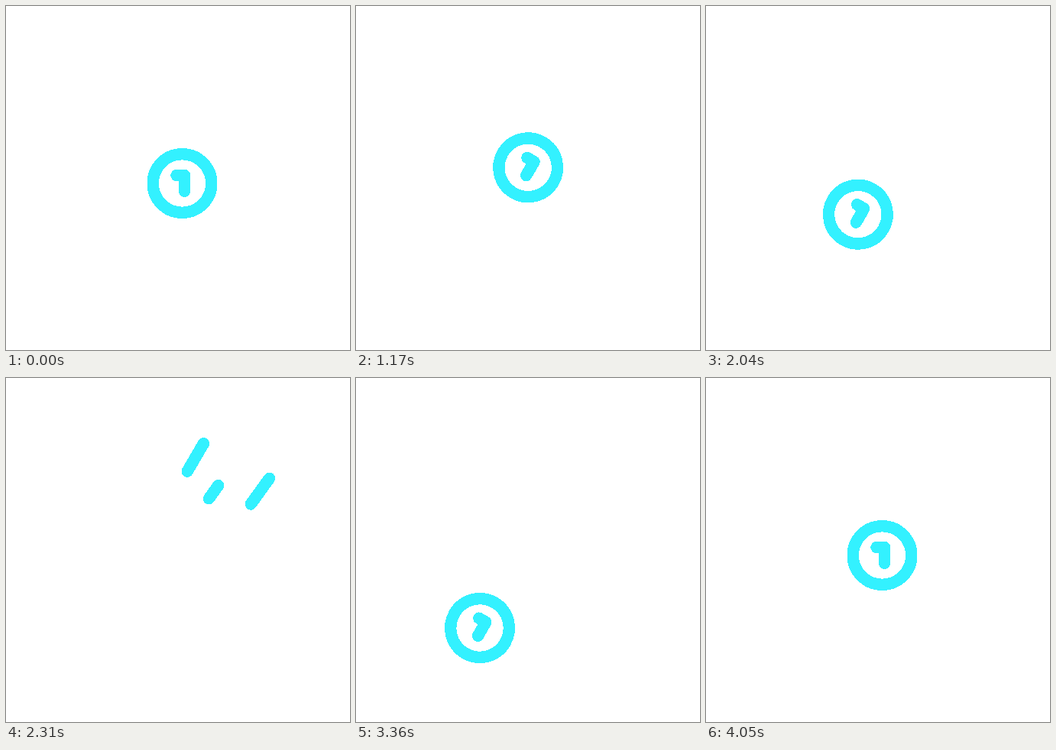
Animation of 450 by 450 pixels, one loop 4380 ms. Source, as an HTML page:

```html
<!DOCTYPE html>
<html lang="en">
<head>
<meta charset="utf-8">
<title>Launch loop</title>
<style>
  html, body { margin: 0; width: 100%; height: 100%; overflow: hidden; background: #fff; }
  svg { display: block; width: 100vw; height: 100vh; }
</style>
</head>
<body>
<svg viewBox="0 0 450 450" fill="none" stroke="#33f1ff" stroke-width="15.4"
     stroke-linecap="round" stroke-linejoin="round" shape-rendering="crispEdges">
  <g id="streaks"></g>
  <g id="badge">
    <circle r="38.3"/>
    <path d="M-7.5 -10.5H3V10.3"/>
  </g>
</svg>
<script>
const LOOP = 4380, STEP = 30;
const TILT = 30;
const REST = [230.5, 232], PEAK = [228, 205], PULLED = [165, 327], LANDED = [229, 232];
const RISE_END = 442, HOVER_HALF = 456, PULL_START = 1690, LAUNCH = 1940;
const ENTER = 2900, LAND = 3600, SETTLE = 4050;

const badge = document.getElementById("badge");
const clamp = x => Math.max(0, Math.min(1, x));
const progress = (t, a, b) => clamp((t - a) / (b - a));
const smooth = u => (1 - Math.cos(Math.PI * u)) / 2;
const mix = (a, b, u) => a + (b - a) * u;
const mixPoint = (p, q, u) => [mix(p[0], q[0], u), mix(p[1], q[1], u)];

// Start point, direction in degrees, length
const streaks = [
  { x: 185.5, y: 211, angle: 59.8, len: 178 },
  { x: 235, y: 200, angle: 54.3, len: 90 },
  { x: 261, y: 247.5, angle: 54.3, len: 176 }
].map(s => {
  const el = document.createElementNS("http://www.w3.org/2000/svg", "path");
  document.getElementById("streaks").append(el);
  return { ...s, el };
});

function hover(t) {
  const c = Math.cos(Math.PI * (t - RISE_END) / HOVER_HALF);
  return [224 + 4 * c, 214 - 9 * c];
}

function pose(t) {
  if (t < RISE_END) {
    const u = smooth(t / RISE_END);
    return [...mixPoint(REST, PEAK, u), TILT * u];
  }
  if (t < PULL_START) return [...hover(t), TILT];
  if (t < LAUNCH) {
    const u = smooth(progress(t, PULL_START, LAUNCH));
    return [...mixPoint(hover(PULL_START), PULLED, u), TILT];
  }
  if (t < ENTER) {
    const d = 0.0064 * (t - LAUNCH) ** 2;
    return [PULLED[0] + d * 0.529, PULLED[1] - d * 0.849, TILT];
  }
  if (t < LAND) {
    const left = 442 * (1 - smooth(progress(t, ENTER, LAND)));
    return [LANDED[0] - left * 0.576, LANDED[1] + left * 0.817, TILT];
  }
  const u = smooth(progress(t, LAND, SETTLE));
  return [...mixPoint(LANDED, REST, u), TILT * (1 - u)];
}

function drawStreaks(t) {
  const u = progress(t, 2130, 2550);
  const shown = u > 0 && u < 1;
  const head = 1 - (1 - u) ** 3;
  const tail = 1 - (1 - u) ** 1.54;
  for (const s of streaks) {
    const a = s.angle * Math.PI / 180;
    const at = f => [s.x + Math.cos(a) * s.len * f, s.y - Math.sin(a) * s.len * f];
    s.el.setAttribute("d", shown ? `M${at(tail)}L${at(head)}` : "");
  }
}

function draw(t) {
  const [x, y, angle] = pose(t);
  badge.setAttribute("transform", `translate(${x} ${y}) rotate(${angle})`);
  drawStreaks(t);
}

const begin = performance.now();
function tick(now) {
  const t = Math.max(0, now - begin) % LOOP;
  draw(Math.floor(t / STEP) * STEP);
  requestAnimationFrame(tick);
}
draw(0);
requestAnimationFrame(tick);
</script>
</body>
</html>
```
